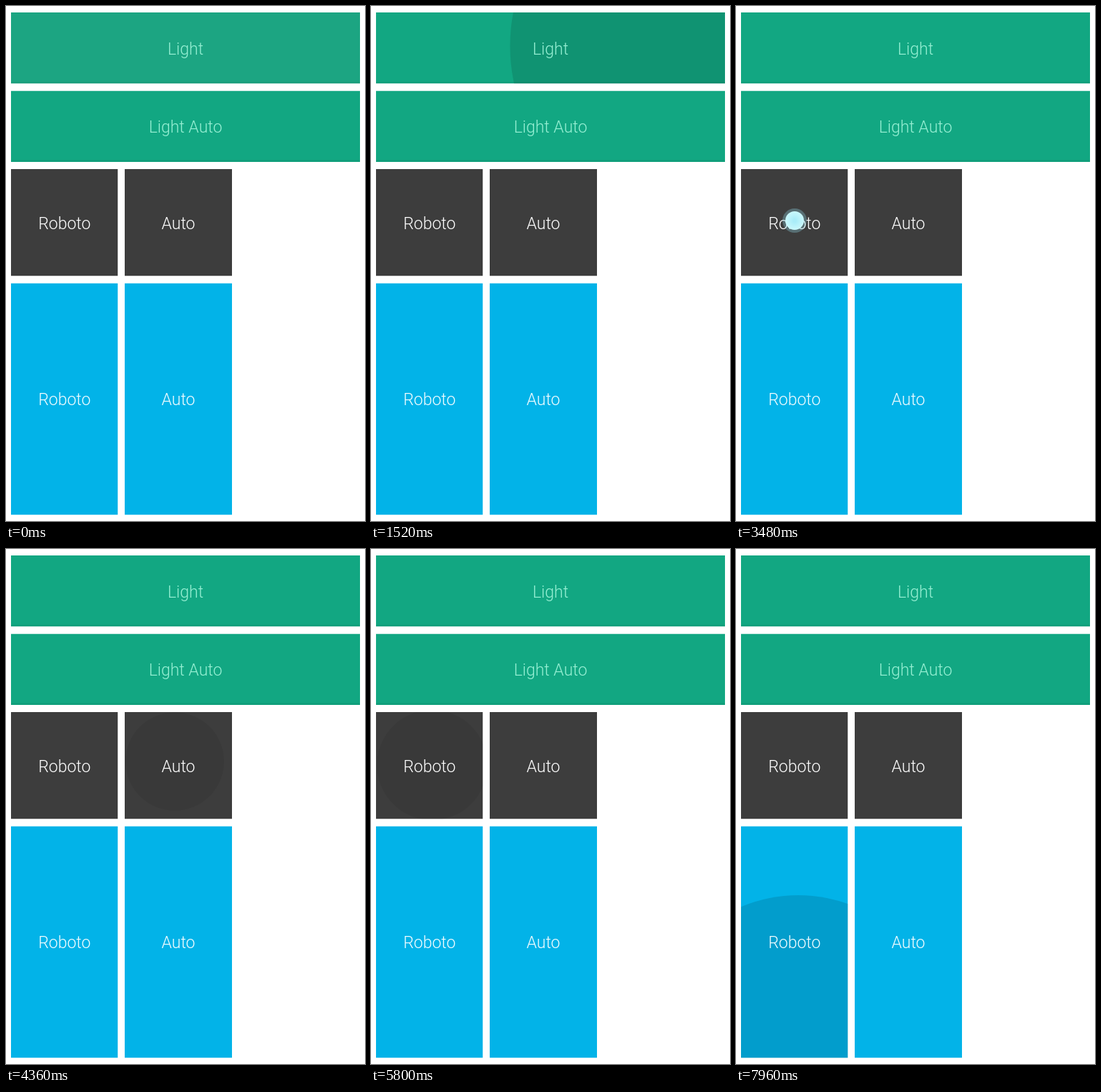
These frames come from a looping animation (502 by 720 pixels, 8000 ms). An HTML page with a canvas:

```html
<!DOCTYPE html>
<html lang="en">
<head>
<meta charset="utf-8">
<title>Ripple tiles</title>
<style>
  html, body { margin: 0; width: 100%; height: 100%; overflow: hidden; background: #fff; }
  canvas { display: block; }
</style>
</head>
<body>
<canvas id="stage" width="502" height="720"></canvas>
<script>
const ctx = document.getElementById('stage').getContext('2d');
const LOOP = 8000, GROW = 400;

const green = { fill: '#12a782', text: '#96efd3', shade: 0.12, edge: true };
const dark = { fill: '#3d3d3d', text: '#ffffff', shade: 0.07 };
const blue = { fill: '#02b3e8', text: '#f2fcff', shade: 0.12 };

// Ripples: centre, start time, final radius, and an optional pause [time, length].
const tiles = [
  { x: 7, y: 9, w: 488, h: 99.5, label: 'Light', style: green, ripples: [
    { x: 443, y: 56, start: 1358, radius: 383 },
    { x: 244.5, y: 57, start: 2309, radius: 180 }] },
  { x: 7, y: 118.5, w: 488, h: 99.5, label: 'Light Auto', style: green, ripples: [] },
  { x: 7, y: 228, w: 149.5, h: 149.5, label: 'Roboto', style: dark, ripples: [
    { x: 82, y: 300, start: 3500, radius: 130 },
    { x: 85.5, y: 302, start: 5655, radius: 130, pause: [5800, 120] }] },
  { x: 166, y: 228, w: 150, h: 149.5, label: 'Auto', style: dark, ripples: [
    { x: 236, y: 297, start: 4240, radius: 135, pause: [4360, 240] }] },
  { x: 7, y: 387.5, w: 149.5, h: 324, label: 'Roboto', style: blue, ripples: [
    { x: 84.5, y: 403, start: 6557, radius: 246 },
    { x: 87, y: 690, start: 7785, radius: 300 }] },
  { x: 166, y: 387.5, w: 150, h: 324, label: 'Auto', style: blue, ripples: [
    { x: 258.5, y: 420, start: 6850, radius: 229 }] }
];

const clamp = v => Math.max(0, Math.min(1, v));

function disc(x, y, r, fill) {
  ctx.fillStyle = fill;
  ctx.beginPath();
  ctx.arc(x, y, r, 0, Math.PI * 2);
  ctx.fill();
}

function drawRipple({ x, y, start, radius, pause }, shade, t) {
  const held = pause ? Math.max(0, Math.min(pause[1], t - pause[0])) : 0;
  const p = (t - start - held) / GROW;
  if (p <= 0 || p >= 1.25) return;
  const alpha = shade * (1 - clamp((p - 0.7) / 0.55));
  disc(x, y, radius * (1 - (1 - clamp(p)) ** 2), `rgba(0,0,0,${alpha})`);
}

function drawTouch({ x, y, start }, t) {
  const age = t - start;
  ctx.globalAlpha = clamp((age + 140) / 60) * clamp((70 - age) / 60);
  if (ctx.globalAlpha > 0) {
    disc(x, y, 17, 'rgba(150,225,240,0.3)');
    const core = ctx.createRadialGradient(x, y, 2, x, y, 13);
    core.addColorStop(0, '#a9ecf8');
    core.addColorStop(1, '#caf8fc');
    disc(x, y, 13, core);
  }
  ctx.globalAlpha = 1;
}

function drawTile({ x, y, w, h, label, style, ripples }, t) {
  ctx.save();
  ctx.beginPath();
  ctx.rect(x, y, w, h);
  ctx.clip();
  ctx.fillStyle = style.fill;
  ctx.fillRect(x, y, w, h);
  for (const r of ripples) drawRipple(r, style.shade, t);
  if (style.edge) {
    ctx.fillStyle = 'rgba(0,0,0,0.05)';
    ctx.fillRect(x, y + h - 3, w, 3);
  }
  ctx.restore();
}

function drawLabel({ x, y, w, h, label, style }) {
  ctx.fillStyle = style.text;
  ctx.fillText(label, x + w / 2, y + h / 2 + 8.8);
}

function render(t) {
  ctx.fillStyle = '#fff';
  ctx.fillRect(0, 0, 502, 720);
  for (const tile of tiles) drawTile(tile, t);

  // Remaining tint of a ripple that is already fading on the first tile.
  const top = tiles[0];
  ctx.fillStyle = `rgba(106,150,130,${0.12 * clamp(1 - t / 300)})`;
  ctx.fillRect(top.x, top.y, top.w, top.h);

  ctx.font = '300 23px Roboto, sans-serif';
  ctx.textAlign = 'center';
  tiles.forEach(drawLabel);
  for (const { ripples } of tiles) for (const r of ripples) drawTouch(r, t);
}

const origin = performance.now();
function tick() {
  render((performance.now() - origin) % LOOP);
  requestAnimationFrame(tick);
}
tick();
</script>
</body>
</html>
```
